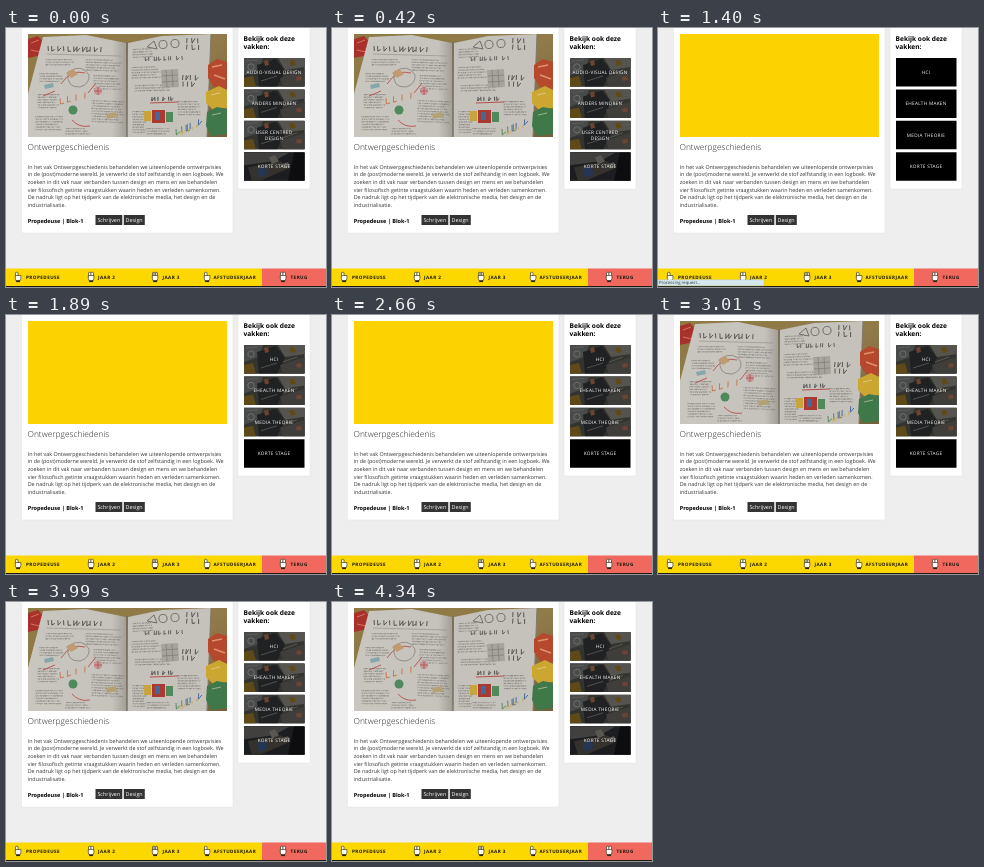
Animation, 320 px wide and 259 px high, one loop 4.41 s. Source, as an HTML page:

```html
<!DOCTYPE html>
<html lang="nl">
<head>
<meta charset="utf-8">
<title>Ontwerpgeschiedenis</title>
<style>
  html, body { margin: 0; width: 100%; height: 100%; overflow: hidden; background: #eee; }
  svg { display: block; width: 100vw; height: 100vh; }
  text { font-family: "Open Sans", "Noto Sans", sans-serif; text-rendering: geometricPrecision; white-space: pre; }
  .body { font-size: 5.38px; fill: #333; }
  .bold { font-weight: 700; }
  .tag { font-size: 5.4px; fill: #fff; }
  .label { font-size: 4.7px; letter-spacing: .28px; fill: #fff; text-anchor: middle; }
  .nav { font-size: 4.6px; letter-spacing: .45px; font-weight: 700; fill: #1a1608; }
</style>
</head>
<body>
<svg id="stage" viewBox="0 0 320 259" preserveAspectRatio="none">
  <defs>
    <linearGradient id="wood" x2="1" y2="1">
      <stop stop-color="#8d7a44"/><stop offset=".5" stop-color="#927b4a"/><stop offset="1" stop-color="#75603c"/>
    </linearGradient>
    <linearGradient id="paper">
      <stop stop-color="#c9c6bf"/><stop offset=".85" stop-color="#c6c3bd"/><stop offset="1" stop-color="#a19d95"/>
    </linearGradient>
    <clipPath id="photoClip"><path d="M22 6h199v103H22z"/></clipPath>
    <clipPath id="thumbClip"><path d="M0 0h60.5v28.5H0z"/></clipPath>
    <clipPath id="loadedClip"><rect id="loaded" x="238" y="124.2" width="61" height="28.5"/></clipPath>
    <g id="desk" clip-path="url(#thumbClip)">
      <path fill="#33332f" d="M0 0h61v29H0z"/>
      <path fill="#494a4a" d="M0 0h19l-4 12-15 5z"/>
      <path fill="#56544f" d="M34 0h27v9l-20 3z"/>
      <path fill="#202123" d="M13 7l19-6 9 12-8 16H15z"/>
      <path fill="#5e4a18" d="M0 20l9-2 3 11H0zM45 3l5-1 2 5-5 1z"/>
      <path fill="#3f3e3b" d="M36 20l25-8v17H39z"/>
      <path fill="#6b4534" d="M20 3l4-1 1 5-4 1zM52 19l5-1 1 4-5 1z"/>
      <circle cx="7" cy="9" r="3.2" fill="none" stroke="#777" stroke-width=".8"/>
      <path fill="none" stroke="#66645f" stroke-width=".7" d="M17 23l16-5M39 17l14-5M2 3l12-1"/>
    </g>
    <g id="office" clip-path="url(#thumbClip)">
      <path fill="#1c1d20" d="M0 0h61v29H0z"/>
      <path fill="#41403e" d="M0 0h46l-16 9-30 4z"/>
      <path fill="#35322d" d="M4 15l33-6 8 7-30 13H8z"/>
      <path fill="#263552" d="M13 17l8-3 3 8-9 4z"/>
      <path fill="#5a5752" d="M25 5l6-2 4 6-7 3zM37 12l7-2 2 4-6 2z"/>
      <path fill="#0d0d0f" d="M50 0h11v29H44z"/>
    </g>
  </defs>

  <path fill="#eee" d="M0 0h320v259H0z"/>
  <path fill="#fff" stroke="#e2e2e2" stroke-width=".5" d="M15.5-1h211.5v206H15.5zM232-1h72v162h-72z"/>
  <path fill="#fcd200" d="M22 6h199v103H22z"/>
  <g id="photo" clip-path="url(#photoClip)"></g>
  <text x="21.5" y="122.3" font-size="8.4" font-weight="300" fill="#222">Ontwerpgeschiedenis</text>
  <g id="copy" class="body"></g>
  <text x="21.7" y="195" font-size="5.55" class="bold">Propedeuse | Blok-1</text>
  <path fill="#333" d="M89.5 187h26.8v10H89.5zM117.8 187h21v10h-21z"/>
  <text x="91.4" y="193.8" class="tag">Schrijven</text>
  <text x="119.5" y="193.8" class="tag">Design</text>
  <text x="237.6" y="12.6" font-size="6.6" class="bold">Bekijk ook deze</text>
  <text x="237.6" y="21.2" font-size="6.6" class="bold">vakken:</text>
  <g id="thumbs"></g>

  <path fill="#fcd800" d="M0 240.4h256v17.6H0z"/>
  <path fill="#f1685f" d="M256 240.4h64v17.6h-64z"/>
  <path fill="#1c1a10" d="M0 258h320v1H0z"/>
  <g id="nav"></g>
  <g id="status">
    <path fill="#d3e8ef" stroke="#a9bcc2" stroke-width=".4" d="M0 251.8h106v6H0z"/>
    <text x="1" y="256.4" font-size="4.3" fill="#333">Processing request...</text>
  </g>
</svg>
<script>
const LOOP = 4410;
const RELOAD = 1120, THUMBS_READY = 1820, PHOTO_READY = 3010;
const LAST_THUMB_START = 3570, LAST_THUMB_READY = 3710;
const THUMB_HEIGHT = 28.5, FIRST_PART = 13;
const $ = id => document.getElementById(id);
const path = (d, fill) => `<path d="${d}" fill="${fill}"/>`;
const stroke = (d, color, width, extra = '') =>
  `<path d="${d}" fill="none" stroke="${color}" stroke-width="${width}" ${extra}/>`;

let seed = 7;
const random = () => (seed = seed * 16807 % 2147483647) / 2147483647;

// Uneven pen strokes that stand for handwriting.
function scribble(x, y, width, rows, slope = 0, height = 1.1, color = '#77736e') {
  let d = '';
  for (let row = 0; row < rows; row++) {
    const end = width * (.75 + .25 * random());
    for (let dx = 0; dx < end; dx += height * (.5 + random())) {
      const top = y + row * (height + 1.5) + dx * slope;
      d += `M${(x + dx).toFixed(1)} ${top.toFixed(1)}l${(random() - .5).toFixed(1)} ${height}`;
      if (random() > .5) d += `l${(height * .6).toFixed(1)} ${(-height * random()).toFixed(1)}`;
    }
  }
  return stroke(d, color, .35 + height * .1);
}

function drawPhoto() {
  const ink = '#45423f', red = '#b7504a', orange = '#c7744a', green = '#4e8a5c', blue = '#45689a';
  return path('M22 6h199v103H22z', 'url(#wood)')
    + path('M22 11l10-3 7 8-3 11-14 3z', '#a8322b')
    + stroke('M25 15l8-3M25 22l9 2', '#d4735f', 1)
    + path('M37 9l43-2 40 8 1 94H22V66z', 'url(#paper)')
    + path('M122 15l34-7 49-2-4 103h-80z', '#c5c2bc')
    + stroke('M121 14v95', '#716b62', 1.3)
    + stroke('M205 6l-4 103', '#827867', 1)
    // left page
    + scribble(42, 18, 74, 1, .02, 5, ink)
    + stroke('M41 26l74 2', '#8f8a82', .6)
    + scribble(40, 31, 28, 3) + scribble(80, 31, 36, 5, .03) + scribble(34, 45, 24, 4)
    + scribble(88, 47, 28, 6, .03) + scribble(32, 66, 22, 6) + scribble(86, 72, 32, 9, .04)
    + scribble(30, 88, 28, 6) + scribble(60, 100, 24, 3)
    + scribble(54, 70, 30, 1, -.22, 6, orange)
    + stroke('M55 56q10-15 24-11M66 92q7 8 18 6M82 65l8-10M49 63l-12 5', red, .9)
    + stroke('M62 44q14-9 21 3 1 9-9 12-14 1-12-15z', '#86817a', .8)
    + path('M60 45l7-4 5 5-7 4z', '#c19a72')
    + `<circle cx="67" cy="82" r="4.5" fill="${green}"/><circle cx="92" cy="63" r="4" fill="#c5969a"/>`
    + stroke('M92 59v8M88 63h8', red, .8)
    + path('M38 57l9-2 1 4-9 2z', '#87a6ac') + path('M100 86l10-2 1 5-10 2z', '#b4a276')
    // right page
    + scribble(127, 21, 22, 4, -.05) + scribble(139, 29, 50, 1, -.03, 4, ink)
    + scribble(126, 39, 30, 5, -.03) + scribble(129, 57, 40, 3, -.02) + scribble(127, 83, 13, 9)
    + scribble(172, 73, 23, 6) + scribble(141, 100, 25, 3)
    + scribble(181, 10, 15, 2, .04, 5, ink) + scribble(177, 47, 15, 2, .02, 5, ink)
    + scribble(146, 69, 24, 1, -.02, 4, '#252422') + stroke('M144 75l28-1', red, 1)
    + stroke('M153 17a4 4 0 1 1 8-1a4 4 0 1 1-8 1M165 16a4 4 0 1 1 8-1a4 4 0 1 1-8 1M141 19l7-6 3 8z', '#716d68', 1)
    + path('M155 42l17-1 1 18-17 1z', '#a7a39d')
    + stroke('M160 42l1 17M166 42l1 17M156 48l16-1M156 54l16-1', '#78746e', .6)
    + path('M138 83h7v10h-7z', '#c7a43d') + path('M146 82h13v13h-13z', '#aa3931')
    + path('M149 84h5v8h-5z', blue) + path('M160 84h7v10h-7z', green)
    + scribble(170, 101, 15, 1, -.45, 6, green) + scribble(180, 97, 15, 1, -.45, 6, blue)
    + scribble(175, 104, 20, 1, -.45, 3, '#c5a33c')
    // objects beside the book
    + path('M202 37l9-6 10 3v27l-13-2-6-9z', '#b6482d')
    + stroke('M206 39l10-2M208 47l11 4', '#df936d', 1.4)
    + path('M200 64l13-6 8 4v18l-14 2-7-7z', '#cba631')
    + path('M201 84l10-5 10 2v25l-16 2-5-10z', '#3f7949')
    + stroke('M205 67l9-2M206 87l9-2', '#ede3c9', .9, 'opacity=".6"');
}

function drawThumbs() {
  const before = [['AUDIO-VISUAL DESIGN'], ['ANDERS MINDREN'], ['USER CENTRED', 'DESIGN'], ['KORTE STAGE']];
  const after = [['HCI'], ['EHEALTH MAKEN'], ['MEDIA THEORIE'], ['KORTE STAGE']];
  const label = (lines, y) => lines.map((line, i) =>
    `<text class="label" x="268" y="${y + (i - (lines.length - 1) / 2) * 6.4}">${line}</text>`).join('');
  return before.map((lines, i) => {
    const y = 30 + i * 31.4;
    const picture = i < 3
      ? `<use class="desk" href="#desk" x="238" y="${y}"/>`
      : `<g clip-path="url(#loadedClip)"><use href="#office" x="238" y="${y}"/></g>`;
    return path(`M238 ${y}h60.5v${THUMB_HEIGHT}h-60.5z`, '#000') + picture
      + `<g class="before">${label(lines, y + 15.9)}</g><g class="after">${label(after[i], y + 15.9)}</g>`;
  }).join('');
}

function hand(x, fingers) {
  let out = '';
  for (let i = 0; i < fingers; i++) {
    const width = 5 / Math.max(fingers, 2);
    out += `<rect x="${x + .5 + i * (5 - width) / Math.max(fingers - 1, 1)}" y="244.3" width="${width}" height="5" rx=".7"/>`;
  }
  return `<g fill="#fff" stroke="#29230f" stroke-width=".6">${out}
    <path d="M${x + .3} 247.5h5.6v3l-1 2.5h-3.6l-1-2z"/></g>`
    + path(`M${x + 1.2} 252.3h3.8v1.8h-3.8z`, '#29230f');
}

const copy = [
  'In het vak Ontwerpgeschiedenis behandelen we uiteenlopende ontwerpvisies',
  'in de (post)moderne wereld. Je verwerkt de stof zelfstandig in een logboek. We',
  'zoeken in dit vak naar verbanden tussen design en mens en we behandelen',
  'vier filosofisch getinte vraagstukken waarin heden en verleden samenkomen.',
  'De nadruk ligt op het tijdperk van de elektronische media, het design en de',
  'industrialisatie.'
];
const navItems = [
  [9, 20, 'PROPEDEUSE', 1], [82, 92, 'JAAR 2', 2], [146, 156.5, 'JAAR 3', 3],
  [198, 207.5, 'AFSTUDEERJAAR', 1], [274, 284.5, 'TERUG', 2]
];

$('photo').innerHTML = drawPhoto();
$('copy').innerHTML = copy.map((line, i) => `<text x="21.7" y="${140.8 + i * 7.65}">${line}</text>`).join('');
$('thumbs').innerHTML = drawThumbs();
$('nav').innerHTML = navItems.map(([iconX, textX, label, fingers]) =>
  hand(iconX, fingers) + `<text class="nav" x="${textX}" y="250.8">${label}</text>`).join('');

const all = selector => [...document.querySelectorAll(selector)];
const desks = all('.desk'), before = all('.before'), after = all('.after');
const show = (element, visible) => element.style.display = visible ? '' : 'none';

function render(now) {
  const t = now % LOOP;
  const old = t < RELOAD;
  show($('photo'), old || t >= PHOTO_READY);
  show($('status'), !old && t < THUMBS_READY);
  desks.forEach(desk => show(desk, old || t >= THUMBS_READY));
  // The last thumbnail arrives in two parts, from the top down.
  const height = old || t >= LAST_THUMB_READY ? THUMB_HEIGHT : t >= LAST_THUMB_START ? FIRST_PART : 0;
  $('loaded').setAttribute('height', height);
  before.forEach(label => show(label, old));
  after.forEach(label => show(label, !old));
  requestAnimationFrame(render);
}
render(performance.now());
</script>
</body>
</html>
```
